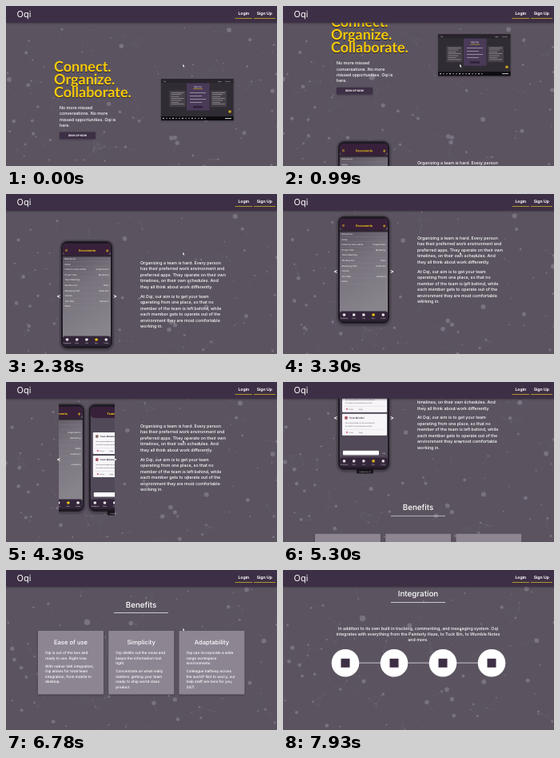
Write an HTML page with a canvas that moves like this. It is 339 by 200 pixels and loops after 8 s.

```html
<!DOCTYPE html>
<html lang="en">
<head>
<meta charset="utf-8">
<title>Oqi</title>
<style>
  html, body { margin: 0; width: 100%; height: 100%; overflow: hidden; background: #5b5460; }
  canvas, svg.stage { position: absolute; inset: 0; width: 100%; height: 100%; }
  text { font-family: Inter, "Open Sans", sans-serif; fill: #fff; text-rendering: geometricPrecision; }
  .logo { font-size: 11px; }
  .body { font-size: 5.3px; font-weight: 500; }
  .nav { font-size: 5.1px; font-weight: 700; }
  .small { font-size: 4.6px; font-weight: 500; }
  .button { font-size: 3.4px; font-weight: 700; }
  .tiny { font-size: 2.7px; }
  .micro { font-size: 1.8px; }
  .hero { font: 700 18px Lato, "Noto Sans", sans-serif; fill: #f9cc0a; filter: drop-shadow(.8px 1.2px .6px #2b2230); }
  .heading { font-size: 9.8px; font-weight: 500; }
  .card { font-size: 7.6px; font-weight: 500; }
  .screen-title { font-size: 3.8px; font-weight: 700; }
  .arrow { font-size: 7px; font-weight: 700; }
  .bold { font-weight: 700; }
  .mid { text-anchor: middle; }
  .end { text-anchor: end; }
  .gold { fill: #f2c811; }
  .ink { fill: #3d2f45; }
  .shade { filter: drop-shadow(.5px 1px 1.2px #2b223090); }

  #page { animation: scroll 8s infinite; }
  @keyframes scroll {
    0%, 6.5% { transform: translateY(0); animation-timing-function: ease-in; }
    12.4% { transform: translateY(-56px); animation-timing-function: ease-out; }
    24%, 31% { transform: translateY(-166px); animation-timing-function: ease-in-out; }
    37.5%, 59% { transform: translateY(-197px); animation-timing-function: ease-in; }
    66.25% { transform: translateY(-249px); animation-timing-function: ease-out; }
    77%, 86% { transform: translateY(-363px); animation-timing-function: ease-in-out; }
    97%, 100% { transform: translateY(-540px); }
  }
  #slides { animation: slide 8s infinite; }
  @keyframes slide {
    0%, 50% { transform: translateX(0); animation-timing-function: ease-in-out; }
    57.5%, 100% { transform: translateX(-70px); }
  }
</style>
</head>
<body>
<canvas width="339" height="200"></canvas>
<svg class="stage" viewBox="0 0 339 200" preserveAspectRatio="none">
  <defs>
    <clipPath id="window"><rect x="66" y="220" width="70" height="148"/></clipPath>
    <linearGradient id="sheen" x2=".3" y2="1">
      <stop offset=".1" stop-color="#5a535f"/>
      <stop offset=".5" stop-color="#77727c"/>
      <stop offset="1" stop-color="#88848c"/>
    </linearGradient>
  </defs>
  <g id="page"></g>
  <g id="header"></g>
  <path d="M221 72.5v4l1-.8.7 1.5.7-.3-.7-1.5h1.3z" fill="#fff" stroke="#222" stroke-width=".3"/>
</svg>
<script>
const INK = '#3d2f45', GOLD = '#f2c811', PLUM = '#38203a';

const rect = (x, y, w, h, fill, r = 0, extra = '') =>
  `<rect x="${x}" y="${y}" width="${w}" height="${h}" rx="${r}" fill="${fill}" ${extra}/>`;
const circle = (x, y, r, fill) => `<circle cx="${x}" cy="${y}" r="${r}" fill="${fill}"/>`;
const text = (x, y, cls, str) => `<text x="${x}" y="${y}" class="${cls}">${str}</text>`;
const lines = (x, y, step, cls, rows) => rows.map((row, i) => text(x, y + i * step, cls, row)).join('');
const repeat = (n, draw) => Array.from({ length: n }, (_, i) => draw(i)).join('');

function hero() {
  return lines(60, 82, 16.1, 'hero', ['Connect.', 'Organize.', 'Collaborate.']) +
    lines(67, 129, 7.4, 'body', ['No more missed', 'conversations. No more', 'missed opportunities. Oqi is', 'here.']) +
    rect(67, 157.5, 45, 8.5, INK, .5, 'class="shade"') +
    text(89.5, 163, 'mid button', 'SIGN UP NOW') +
    screenshot();
}

function screenshot() {
  const panel = x => rect(x, 106, 20, 20, '#464049') +
    repeat(7, i => rect(x + 2, 108 + i * 2.4, 16 - i % 3 * 3, .6, '#aaa3ae'));
  return rect(194, 91, 90.5, 52, '#302c33', 0, 'class="shade"') +
    rect(194, 91, 90.5, 5, '#29242c') + text(197, 94.6, 'micro', 'Oqi') +
    text(265, 94.5, 'micro', 'Login') + text(274, 94.5, 'micro', 'Sign Up') +
    panel(204.5) + panel(256) +
    rect(226, 96.5, 28.5, 34, '#493a58') +
    text(240, 102, 'mid tiny', 'Sign Up') + rect(234, 103.5, 12, .5, GOLD) +
    repeat(4, i => rect(230, 108 + i * 4, 20 - i % 2 * 5, .6, '#c9c1ce')) +
    rect(234, 125, 12, 2.5, '#2f2138') +
    circle(280, 132, 1.8, '#c9a31f') +
    rect(194, 138, 90.5, 5, '#0d0c10') +
    repeat(14, i => rect(196 + i * 4, 139.8, 2, 1.3, i % 3 ? '#77717d' : '#b9b3bd')) +
    rect(274, 140, 8, .9, '#ddd');
}

const titleBar = label => rect(71, 228, 60, 14, PLUM, 5) + text(101.5, 238.4, 'mid screen-title gold', label);

function phone(screen, content) {
  const nav = ['Dashboard', 'Tasks', 'Chat', 'Docs', 'Profile'];
  return rect(67.5, 223.5, 67, 137, '#48424d', 9, 'class="shade"') +
    rect(69, 225, 64, 134, '#1f1a23', 8) +
    rect(71, 228, 60, 127, screen, 5) + content +
    rect(71, 343.5, 60, 12, '#33263a', 3) +
    nav.map((label, i) => {
      const x = 76.5 + i * 12.2, tint = i === 3 ? GOLD : '#eee';
      return rect(x - 1.6, 346.5, 3.2, 3, tint, .8) + text(x, 352.9, 'mid micro', label);
    }).join('');
}

function documents() {
  const items = ['Resources', 'Notes', 'Infrastructure outline', 'Project Plan', 'Team Meetings', 'My New Doc',
    'Marketing Plan', 'Outline', 'Test Plan', 'Notes'];
  const tags = ['', '', 'Organization', 'Marketing', '', 'Team', 'Collection', '', 'Outreach', ''];
  return titleBar('Documents') +
    repeat(3, i => rect(74, 235.6 + i, 3, .4, GOLD)) +
    rect(125, 236.6, 3.6, .7, GOLD) + rect(126.45, 235.2, .7, 3.6, GOLD) +
    rect(71, 241.5, 60, 3, '#2e2531') +
    items.map((item, i) => {
      const y = 248.2 + i * 6.55;
      return text(73.5, y, 'tiny', item) + text(128.5, y, 'tiny end', tags[i]) +
        rect(72, y + 2, 58, .25, '#8d8792');
    }).join('');
}

function feed() {
  const post = (y, tint) => rect(75, y, 56, 27, '#f7f5f8', 1) + circle(80, y + 5, 2, tint) +
    text(84, y + 5.5, 'tiny ink bold', 'Team Member') +
    lines(79, y + 12, 3.6, 'micro ink', ['Has anyone looked over the new outline for', 'this week? Let me know what you think.']) +
    rect(77, y + 19.2, 52, .25, '#bbb') + circle(81, y + 23, 1, '#d6456b') +
    text(83, y + 23.7, 'micro ink', '2 Likes') + text(96, y + 23.7, 'micro ink', 'Reply');
  return titleBar('Team Chat') +
    `<g transform="translate(-1 0)">${post(260, '#8b6b66')}${post(289, '#a8525e')}</g>` +
    rect(75, 335, 45, 5.5, '#fff', 1) + text(126, 339, 'mid micro', 'Send');
}

function carousel() {
  const caption = rect(92, 358, 21, 5.5, '#17131a', 1) + text(102.5, 361.8, 'mid micro', 'Sample Phone UI');
  return `<g clip-path="url(#window)"><g id="slides">${phone('url(#sheen)', documents())}
      <g transform="translate(70 0)">${phone('#514958', feed())}${caption}</g></g></g>` +
    text(66, 296.3, 'mid arrow', '&lt;') + text(136.5, 296.3, 'mid arrow', '&gt;') +
    lines(168, 254, 7.45, 'body', ['Organizing a team is hard. Every person', 'has their preferred work environment and',
      'preferred apps. They operate on their own', 'timelines, on their own schedules. And', 'they all think about work differently.']) +
    lines(168, 295.7, 7.45, 'body', ['At Oqi, our aim is to get your team', 'operating from one place, so that no',
      'member of the team is left behind, while', 'each member gets to operate out of the', 'environment they are most comfortable', 'working in.']);
}

const heading = (y, label) => text(169, y, 'mid heading', label) + rect(135, y + 6.7, 68, .8, '#e8e5ea');

function benefits() {
  const cards = [
    ['Ease of use', ['Oqi is out of the box and', 'ready to use. Right now.'],
      ['With native VeK integration,', 'Oqi allows for total team', 'integration, from mobile to', 'desktop.']],
    ['Simplicity', ['Oqi distills out the noise and', 'keeps the information tool', 'tight.'],
      ['Concentrate on what really', 'matters: getting your team', 'ready to ship world class', 'product.']],
    ['Adaptability', ['Oqi can incorporate a wide', 'range workspace', 'environments.'],
      ['Colleague halfway across', 'the world? Not to worry, our', 'help staff are here for you,', '24/7.']]
  ];
  return heading(409.5, 'Benefits') + cards.map(([title, intro, detail], i) => {
    const x = 40 + i * 88.2;
    return rect(x, 439, 82, 79.5, '#8d8592', 1, 'class="shade"') + text(x + 41, 455.7, 'mid card', title) +
      lines(x + 9, 468.3, 6.5, 'small', intro) +
      lines(x + 9, 471.8 + intro.length * 6.5, 6.5, 'small', detail);
  }).join('');
}

function integration() {
  return heading(573.4, 'Integration') +
    lines(169, 614.6, 7.4, 'mid body', ['In addition to its own built in tracking, commenting, and messaging system. Oqi',
      'integrates with everything from the Painterly Haze, to Tuck Bin, to Wumble Notes', 'and more.']) +
    rect(78, 655.6, 183, 1, '#c9c4cd') +
    repeat(4, i => circle(78 + i * 61, 656.3, 17.3, '#fff') + rect(72.5 + i * 61, 650.8, 11, 11, INK));
}

document.getElementById('page').innerHTML = hero() + carousel() + benefits() + integration();
document.getElementById('header').innerHTML =
  rect(0, 0, 339, 20.7, INK, 0, 'class="shade"') + text(13.5, 13.6, 'logo', 'Oqi') +
  text(297.3, 11.2, 'mid nav', 'Login') + text(323.3, 11.2, 'mid nav', 'Sign Up') +
  rect(286.5, 15, 21.5, .8, '#cdb024') + rect(310, 15, 27, .8, '#cdb024');

// Drifting backdrop
let seed = 11;
const random = () => (seed = seed * 16807 % 2147483647) / 2147483647;
const drift = () => (random() - .5) * 9;
const large = [[4, 92, 3], [113, 93, 3.8], [279, 30, 3], [250, 142, 3], [207, 165, 2.8], [70, 29, 1.6]];
const dots = Array.from({ length: 130 }, (_, i) => {
  const [x, y, r] = large[i] || [random() * 339, random() * 200, .4 + 2.6 * random() ** 3.5];
  return { x, y, r, vx: drift(), vy: drift() };
});
const ctx = document.querySelector('canvas').getContext('2d');
const wrap = (v, size) => ((v + 5) % size + size) % size - 5;

function draw(now) {
  const t = now % 8000 / 1000;
  const placed = dots.map(d => ({ r: d.r, x: wrap(d.x + d.vx * t, 349), y: wrap(d.y + d.vy * t, 210) }));
  ctx.clearRect(0, 0, 339, 200);
  ctx.lineWidth = .4;
  placed.forEach((a, i) => {
    for (const b of placed.slice(i + 1)) {
      const gap = Math.hypot(a.x - b.x, a.y - b.y);
      if (gap > 26) continue;
      ctx.strokeStyle = `rgba(190,183,196,${.22 * (1 - gap / 26)})`;
      ctx.beginPath();
      ctx.moveTo(a.x, a.y);
      ctx.lineTo(b.x, b.y);
      ctx.stroke();
    }
    ctx.fillStyle = a.r < 1 ? '#8a838f' : '#79727f';
    ctx.beginPath();
    ctx.arc(a.x, a.y, a.r, 0, 7);
    ctx.fill();
  });
  requestAnimationFrame(draw);
}
requestAnimationFrame(draw);
</script>
</body>
</html>
```
